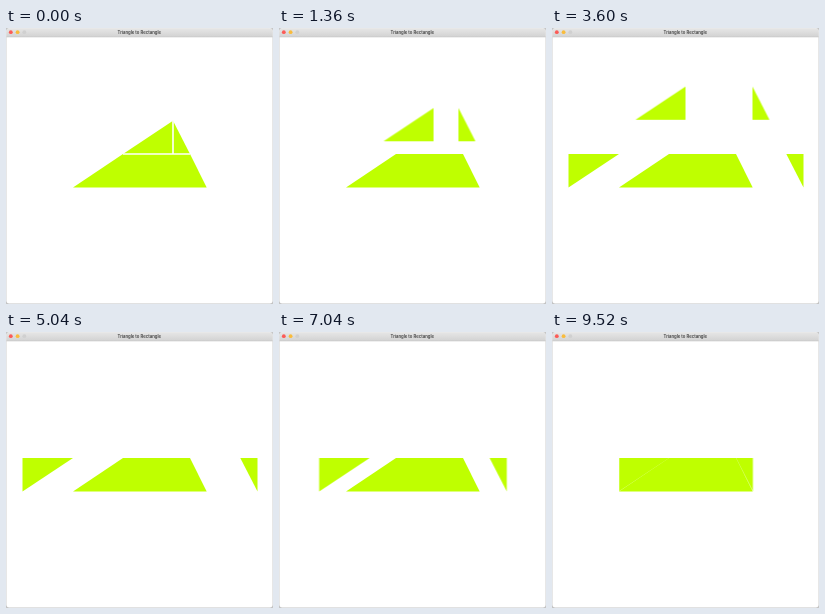
These frames come from a looping animation (267 by 276 pixels, 10000 ms). An HTML page:

```html
<!DOCTYPE html>
<html lang="en">
<head>
<meta charset="utf-8">
<title>Triangle to Rectangle</title>
<style>
  html, body { margin: 0; width: 100%; height: 100%; overflow: hidden; background: #fff; }
  svg { display: block; width: 100vw; height: 100vh; }
  .piece { fill: #bfff00; }
  text { font: 600 4.25px Inter, "Liberation Sans", sans-serif; fill: #3c3c3c; text-anchor: middle; }
</style>
</head>
<body>
<svg viewBox="0 0 267 276">
  <defs>
    <linearGradient id="bar" x2="0" y2="1">
      <stop offset="0" stop-color="#e6e6e6"/>
      <stop offset="1" stop-color="#d2d2d2"/>
    </linearGradient>
  </defs>

  <!-- window -->
  <rect width="267" height="276" fill="#c4c4c4"/>
  <rect x=".4" y=".3" width="266.2" height="275.2" rx="3" fill="#fff"/>
  <path d="M.4 9V3.3a3 3 0 0 1 3-3H263.6a3 3 0 0 1 3 3V9Z" fill="url(#bar)"/>
  <path d="M.4 9H266.6" stroke="#bcbcbc" stroke-width=".5"/>
  <circle cx="4.8" cy="4.2" r="1.9" fill="#fc5b57"/>
  <circle cx="11.6" cy="4.2" r="1.9" fill="#f9bc3c"/>
  <circle cx="18.3" cy="4.2" r="1.9" fill="#d0d0d0"/>
  <text x="133.3" y="5.7">Triangle to Rectangle</text>

  <!-- pieces -->
  <g class="piece">
    <path d="M67 159.5L117 126H184L200.7 159.5Z"/>
    <path id="topLeft" d="M167 92.7V126H117Z"/>
    <path id="topRight" d="M167 92.7L184 126H167Z"/>
    <path id="sideLeft" d="M16.5 126H67L16.5 159.5Z"/>
    <path id="sideRight" d="M234.3 126H251.5V159.5Z"/>
  </g>
  <path id="cuts" d="M117 126H184M167 93V126" fill="none" stroke="#fff" stroke-width="1.6"/>
</svg>
<script>
  const LOOP = 10000;
  const PART = [900, 2140];
  const FLIP = 3200, CLEAR = 4480;
  const JOIN = [6160, 8040];

  const play = (id, frames) =>
    document.getElementById(id).animate(frames, { duration: LOOP, iterations: Infinity });

  const slide = (id, [from, to], x, y) => {
    const start = 'translate(0px, 0px)', end = `translate(${x}px, ${y}px)`;
    play(id, [
      { offset: 0, transform: start },
      { offset: from / LOOP, transform: start },
      { offset: to / LOOP, transform: end },
      { offset: 1, transform: end }
    ]);
  };

  const toggle = (id, at, before) => play(id, [
    { offset: 0, opacity: before, easing: 'step-end' },
    { offset: at / LOOP, opacity: 1 - before },
    { offset: 1, opacity: 1 - before }
  ]);

  slide('topLeft', PART, -33.5, -34.2);
  slide('topRight', PART, 33.5, -34.2);
  slide('sideLeft', JOIN, 50.5, 0);
  slide('sideRight', JOIN, -50.6, 0);

  toggle('cuts', PART[0], 1);
  toggle('topLeft', CLEAR, 1);
  toggle('topRight', CLEAR, 1);
  toggle('sideLeft', FLIP, 0);
  toggle('sideRight', FLIP, 0);
</script>
</body>
</html>
```
